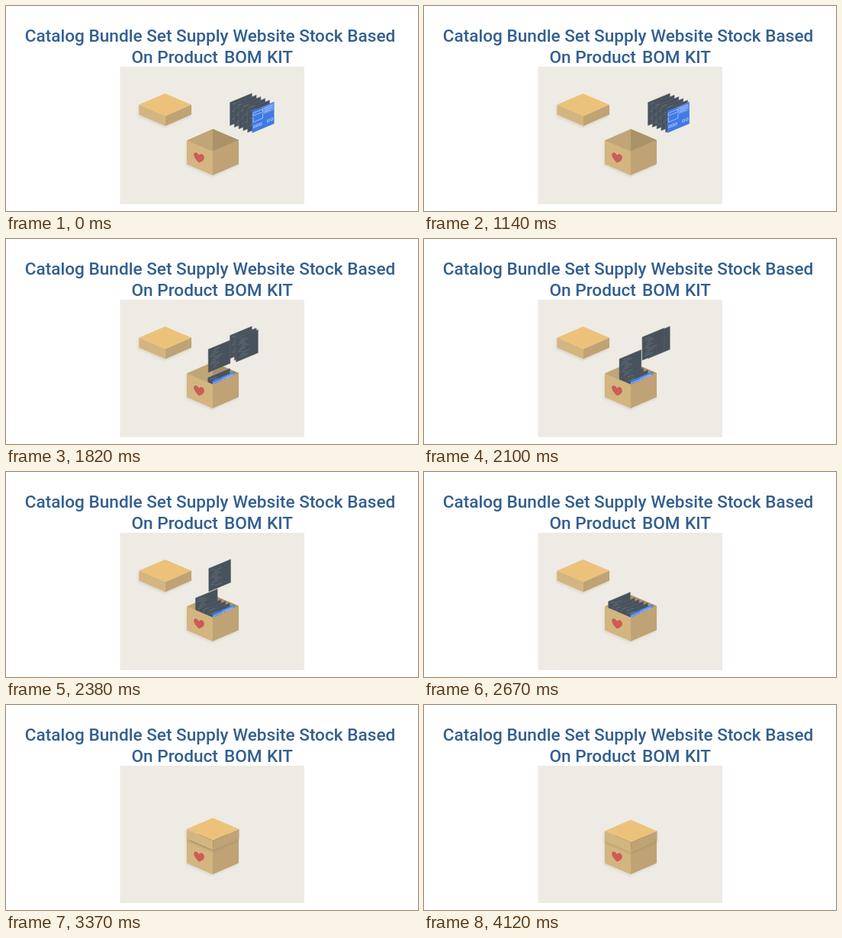
An HTML page for the animation above (4550 ms loop, 540 by 270 pixels).

```html
<!DOCTYPE html>
<html lang="en">
<head>
<meta charset="utf-8">
<title>Box packing</title>
<style>
  html, body { margin: 0; width: 100%; height: 100%; overflow: hidden; background: #fff; }
  svg { display: block; width: 100vw; height: 100vh; }
  text { font: 500 22.6px Roboto, "Open Sans", sans-serif; fill: #335f90; }
  .soft { filter: drop-shadow(-.8px 2.2px 1.5px rgba(60, 45, 20, .11)); }
  .left { fill: #d3b580; }
  .right { fill: #bfa374; }
  .code { fill: none; stroke: #87919a; stroke-width: .7; opacity: .6; }
  .line { fill: none; stroke: #a9c6fa; stroke-width: .8; }
</style>
</head>
<body>
<svg viewBox="0 0 540 270" xmlns="http://www.w3.org/2000/svg">
  <text x="267.5" y="47" text-anchor="middle">Catalog Bundle Set Supply Website Stock Based</text>
  <text y="75"><tspan x="164.5">On Product</tspan><tspan x="286">BOM</tspan><tspan x="342">KIT</tspan></text>
  <rect x="149.5" y="80" width="241.5" height="181" fill="#eeebe4"/>

  <g class="soft">
    <path d="M237 177 271 162 305 176.5V208L271 222.7 237 208Z" fill="#c0a576"/>
  </g>
  <path d="M271 162 305 176.5 271 191Z" fill="#ab9268"/>
  <g id="cards"></g>
  <path class="left" d="M237 177 271 191.5V222.7L237 208Z"/>
  <path class="right" d="M271 191.5 305 176.5V208L271 222.7Z"/>
  <path id="heart" fill="#cc5c55" d="M0 6C-3 4-6.3 1-6.3-2C-6.3-6-1.5-6.6 0-3C1.5-6.6 6.3-6 6.3-2C6.3 1 3 4 0 6Z"/>

  <g id="lid" class="soft">
    <path d="M174.3 130 208.5 115.3 243 130 209 145Z" fill="#ecc27b"/>
    <path class="left" d="M174.3 130 209 145V158L174.3 143Z"/>
    <path class="right" d="M209 145 243 130V143L209 158Z"/>
  </g>
</svg>
<script>
  const LOOP = 4550, COUNT = 6;
  const FIRST = 1064, STAGGER = 227;
  const $ = id => document.getElementById(id);

  // cubic-bezier(.4, 0, .2, 1) from start over span
  function ease(t, start, span) {
    const p = Math.min(1, Math.max(0, (t - start) / span));
    let lo = 0, hi = 1;
    for (let i = 0; i < 20; i++) {
      const s = (lo + hi) / 2, r = 1 - s;
      if (1.2 * r * r * s + .6 * r * s * s + s * s * s < p) lo = s; else hi = s;
    }
    return lo * lo * (3 - 2 * lo);
  }

  function darkCard(i) {
    let d = "";
    for (let r = 0; r < 10; r++) {
      const x = 2.5 + (r * 3 + i) % 4 * 1.6;
      d += `M${x} ${3.5 + r * 2.5}h${5 + (r * 5 + i) % 8}`;
    }
    return `<rect width="28.8" height="30.5" fill="#48525c" stroke="#626c75" stroke-width=".4"/>
      <path class="code" d="${d}"/>`;
  }

  function blueCard() {
    const boxes = [2, 6, 10, 20, 24.5].map(x => `M${x} 20.5h2.6v2.8h-2.6z`).join("");
    return `<rect width="29" height="29" fill="#417ae2"/>
      <path d="M13 1H28.5V11H13Z" fill="#6593ec"/>
      <path class="line" d="M1.5 3.5H14V7H1.5ZM1.5 9V15.5H14V10.5M16 3.5H27M16 6H27M16 8.5H24${boxes}"/>`;
  }

  // index 0 is the rearmost card, the last one is blue and leaves first
  const cards = Array.from({ length: COUNT }, (_, i) => {
    const g = document.createElementNS("http://www.w3.org/2000/svg", "g");
    g.innerHTML = i === COUNT - 1 ? blueCard() : darkCard(i);
    $("cards").append(g);
    return g;
  });

  function draw(t) {
    cards.forEach((card, i) => {
      const start = FIRST + (COUNT - 1 - i) * STAGGER;
      const x = 293.5 + 5.8 * i - 52 * ease(t, start, 500);
      const y = 127 + 2.25 * i + 48.5 * ease(t, start + 190, 450);
      card.setAttribute("transform", `matrix(1 -.42 0 1 ${x} ${y})`);
    });

    const lidX = 62.5 * ease(t, 2755, 500), lidY = 36 * ease(t, 2930, 650);
    $("lid").setAttribute("transform", `translate(${lidX} ${lidY})`);

    const beat = Math.min(1, Math.max(0, (t - 3560) / 560));
    const k = 1.08 + .08 * Math.sin(beat * Math.PI * 3) * (1 - beat);
    $("heart").setAttribute("transform", `translate(253 200) matrix(1 .3 0 1 0 0) scale(${k})`);
  }

  const begin = performance.now();
  function frame() {
    draw((performance.now() - begin) % LOOP);
    requestAnimationFrame(frame);
  }
  frame();
</script>
</body>
</html>
```
